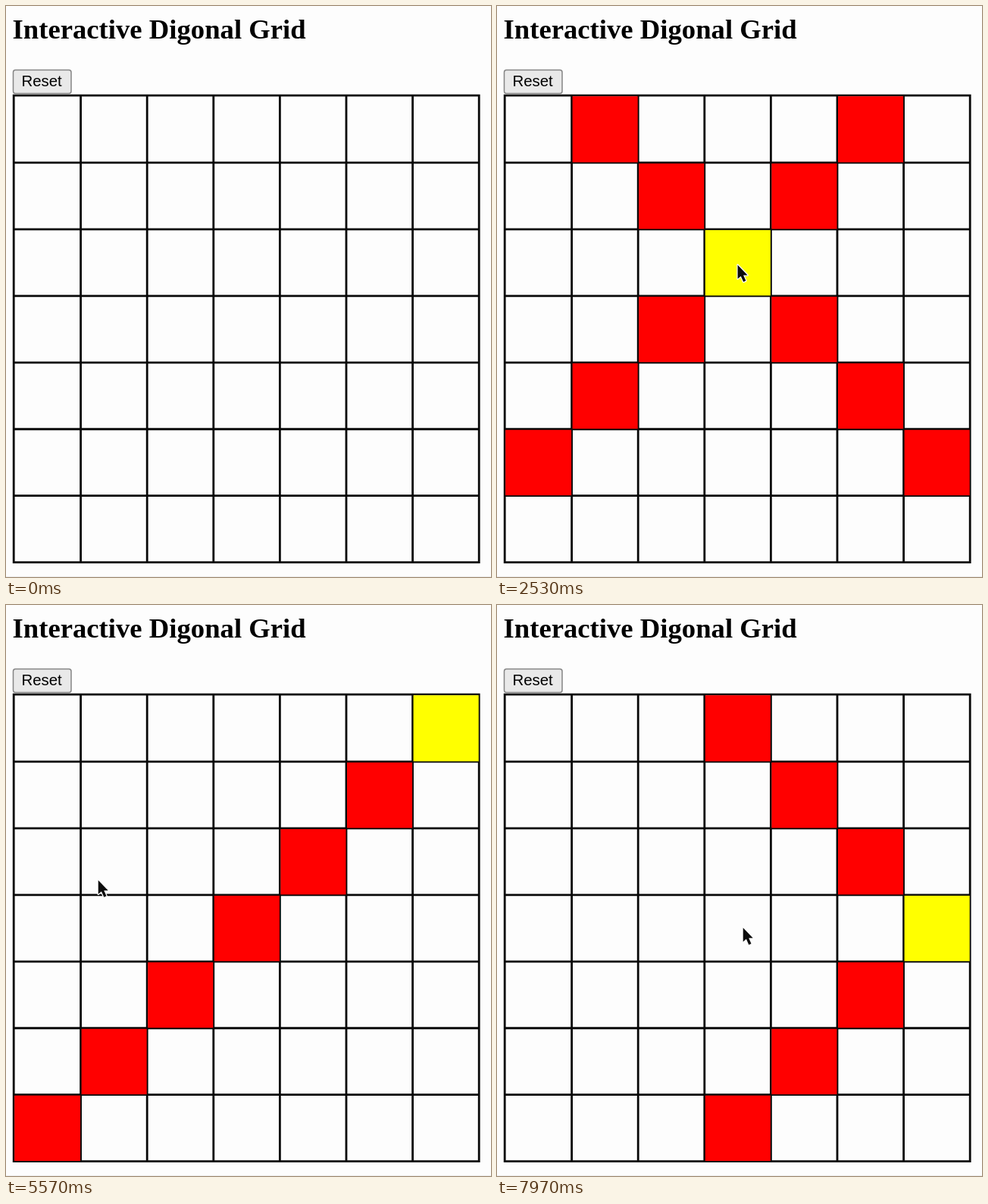
Recreate the animation shown at these times as an HTML page with a canvas. Size 640 by 754 pixels, loop 8 s.

```html
<!DOCTYPE html>
<html lang="en">
<head>
<meta charset="utf-8">
<title>Interactive Digonal Grid</title>
<style>
  html, body { margin: 0; width: 100%; height: 100%; overflow: hidden; background: #fdfdfd; }
  canvas { display: block; width: 100%; height: 100%; }
</style>
</head>
<body>
<canvas id="stage" width="640" height="754"></canvas>
<script>
const ctx = document.getElementById('stage').getContext('2d');
const LOOP = 8000;
const TRAVEL = 600;
const CLICK_DELAY = 110;
const COUNT = 7;
const LEFT = 11, TOP = 119, CELL_W = 87.6, CELL_H = 87.95;
const PAPER = '#fdfdfd';

// Cells the pointer visits, and when it sets off towards each
const stops = [
  { leave: 0, row: -2.2, col: 2.15 },
  { leave: 1400, row: 2, col: 3 },
  { leave: 2950, row: 0, col: 0 },
  { leave: 3820, row: 0, col: 6 },
  { leave: 5105, row: 3, col: 0 },
  { leave: 5990, row: 3, col: 6 },
  { leave: 7430, row: 3, col: 3 }
];

// The outer border sits slightly outside the even spacing
const lineX = i => LEFT + CELL_W * i - (i === 0 ? 0.8 : 0);
const lineY = i => TOP + CELL_H * i - (i === 0 ? 0.8 : 0);
const ease = u => u * u * (3 - 2 * u);
const center = ({ row, col }) => [LEFT + CELL_W * (col + 0.5), TOP + CELL_H * (row + 0.5) + 3];

// Eased travel between cells, bowed down when going right and up when going left
function pointer(t) {
  const i = Math.max(1, stops.findLastIndex(s => t >= s.leave));
  const [x0, y0] = center(stops[i - 1]);
  const [x1, y1] = center(stops[i]);
  const w = (t - stops[i].leave) / TRAVEL;
  const u = ease(Math.min(1, Math.max(0, w)));
  const bow = 0.16 * (x1 - x0) * Math.sin(Math.PI * u);
  return [x0 + (x1 - x0) * u, y0 + (y1 - y0) * u + bow];
}

function text(value, font, x, y) {
  ctx.font = font;
  ctx.fillStyle = '#000';
  ctx.fillText(value, x, y);
}

function drawHeader() {
  text('Interactive Digonal Grid', 'bold 36.7px "Liberation Serif", serif', 8.5, 43);
  ctx.beginPath();
  ctx.roundRect(9.5, 84.5, 76.5, 31, 3);
  ctx.fillStyle = '#e9e9e9';
  ctx.fill();
  ctx.strokeStyle = '#858585';
  ctx.lineWidth = 1.5;
  ctx.stroke();
  text('Reset', '20.4px "Liberation Sans", sans-serif', 20.5, 106);
}

function drawLines() {
  ctx.beginPath();
  for (let i = 0; i <= COUNT; i++) {
    ctx.moveTo(lineX(i), lineY(0));
    ctx.lineTo(lineX(i), lineY(COUNT));
    ctx.moveTo(lineX(0), lineY(i));
    ctx.lineTo(lineX(COUNT), lineY(i));
  }
  ctx.strokeStyle = '#080808';
  ctx.lineWidth = 2.8;
  ctx.lineCap = 'square';
  ctx.stroke();
}

function fillCell(row, col, color) {
  const x = lineX(col) + 1, y = lineY(row) + 1;
  ctx.fillStyle = color;
  ctx.fillRect(x, y, lineX(col + 1) - x - 0.5, lineY(row + 1) - y - 0.5);
}

function drawCells(t) {
  const hit = stops.findLast(s => s.row >= 0 && t >= s.leave + TRAVEL + CLICK_DELAY);
  if (!hit) return;
  for (let r = 0; r < COUNT; r++) {
    for (let c = 0; c < COUNT; c++) {
      if (Math.abs(r - hit.row) !== Math.abs(c - hit.col)) continue;
      fillCell(r, c, r === hit.row ? '#ffff00' : '#ff0000');
    }
  }
}

function drawPointer(t) {
  ctx.save();
  ctx.translate(...pointer(t));
  const arrow = new Path2D('M0 0V18.4L4.2 14.8L7.6 22.4L10.8 20.9L7.5 13.6H13Z');
  ctx.lineJoin = 'round';
  ctx.strokeStyle = PAPER;
  ctx.lineWidth = 2.5;
  ctx.stroke(arrow);
  ctx.fillStyle = '#0c0c0c';
  ctx.fill(arrow);
  ctx.restore();
}

function draw(t) {
  ctx.fillStyle = PAPER;
  ctx.fillRect(0, 0, 640, 754);
  ctx.fillStyle = '#eeeeee';
  ctx.fillRect(0, 753, 640, 1);
  drawHeader();
  drawLines();
  drawCells(t);
  drawPointer(t);
}

const start = performance.now();
function tick() {
  draw((performance.now() - start) % LOOP);
  requestAnimationFrame(tick);
}
tick();
</script>
</body>
</html>
```
